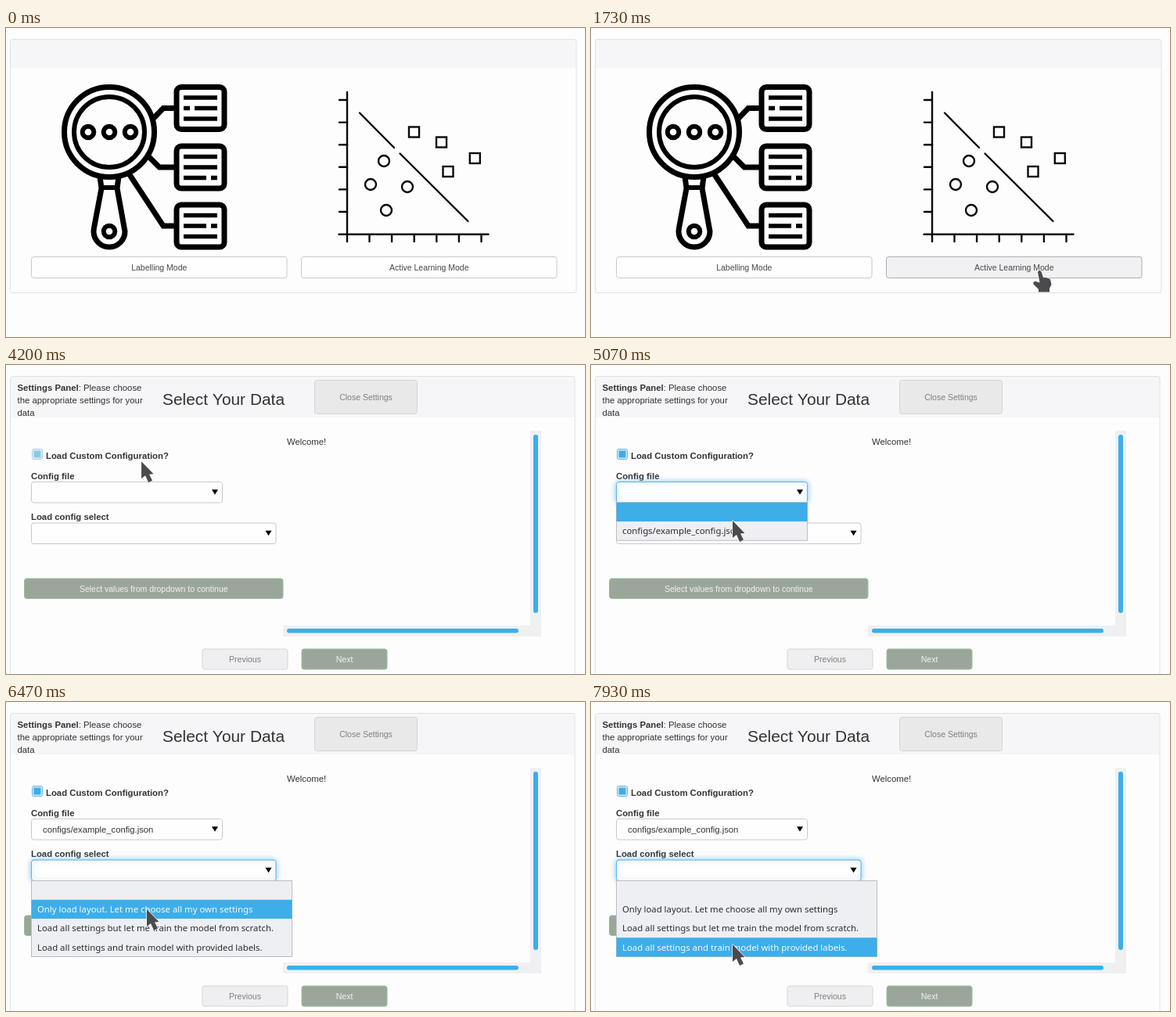
Animation, 740 px wide and 395 px high, one loop 8000 ms. Source, as an HTML page with a canvas:

```html
<!DOCTYPE html>
<html lang="en">
<head>
<meta charset="utf-8">
<title>Settings walkthrough</title>
<style>
html, body { margin: 0; width: 100%; height: 100%; overflow: hidden; background: #fefdfe; }
canvas { display: block; }
</style>
</head>
<body>
<canvas id="stage" width="740" height="395"></canvas>
<script>
const c = document.getElementById('stage').getContext('2d');
const LOOP = 8000, STEP = 1000 / 15;
const SANS = '"Liberation Sans", Arial, sans-serif';
const MENU = '"Noto Sans", "Open Sans", sans-serif';
const BLUE = '#3daee9', PAGE = '#fefdfe', INK = '#333';
const ROW = 24.25;

// Pointer keys: time, x, y
const PATH = [
  [667, 592, 398], [1000, 584, 345], [1200, 577, 321], [1400, 575, 310],
  [2467, 575, 310], [2600, 470, 257], [2800, 202, 147], [3000, 172, 119],
  [4133, 172, 119], [4200, 173, 123], [4330, 180, 148], [4533, 181, 165],
  [4800, 181, 165], [5067, 181, 199], [5200, 181, 211], [5400, 181, 213],
  [5867, 181, 213], [6200, 181, 217], [6467, 180, 265], [6733, 180, 266],
  [7000, 180, 266], [7267, 180, 287], [7600, 181, 294], [7867, 181, 310]
];

const CLICK = { press: 1665, release: 1730, page: 2200, check: 3200, layout: 3330,
  focus1: 4600, open1: 4665, pick1: 5600, focus2: 5930, open2: 6065 };

const clamp = v => Math.max(0, Math.min(1, v));
const fade = (t, at) => clamp((t - at + 40) / 140);

function pointer(t) {
  if (t <= PATH[0][0]) return null;
  const i = PATH.findIndex(k => k[0] > t);
  if (i < 0) return PATH[PATH.length - 1].slice(1);
  const [a, ax, ay] = PATH[i - 1], [b, bx, by] = PATH[i];
  const p = (t - a) / (b - a);
  return [ax + (bx - ax) * p, ay + (by - ay) * p];
}

function text(s, x, y, { size = 11.35, bold, color = INK, align = 'left', font = SANS } = {}) {
  c.font = `${bold ? 'bold ' : ''}${size}px ${font}`;
  c.fillStyle = color;
  c.textAlign = align;
  c.fillText(s, x, y);
}
const bold = (s, x, y) => text(s, x, y, { bold: true });

function box(x, y, w, h, r, fill, stroke) {
  c.beginPath();
  c.roundRect(x, y, w, h, r);
  if (fill) { c.fillStyle = fill; c.fill(); }
  if (stroke) { c.strokeStyle = stroke; c.lineWidth = 1; c.stroke(); }
}

function line(...p) {
  c.beginPath();
  for (let i = 0; i < p.length; i += 2) c.lineTo(p[i], p[i + 1]);
  c.stroke();
}

function ring(x, y, r) {
  c.beginPath();
  c.arc(x, y, r, 0, 7);
  c.stroke();
}

const LOOKS = {
  plain: ['#fffeff', '#c9c8ca', '#484848'],
  hover: ['#f1f0f2', '#adacae', '#484848'],
  off: ['#efeef0', '#d6d5d7', '#808080'],
  close: ['#eae9ea', '#d5d4d6', '#808080'],
  sage: ['#9ba69a', '#93c094', '#f0f3ef']
};
function button(s, x, y, w, h, look) {
  const [fill, edge, ink] = LOOKS[look];
  box(x, y, w, h, 3, fill, edge);
  text(s, x + w / 2, y + h / 2 + 4.3, { size: 10.5, color: ink, align: 'center' });
}

function panel(w, h, head) {
  box(5.5, 14.5, w, h, 3, PAGE);
  c.fillStyle = '#f6f5f7';
  c.fillRect(6, 15, w - 1, head - 15);
  box(5.5, 14.5, w, h, 3, null, '#e1e0e2');
}

function magnifier() {
  c.strokeStyle = '#000';
  c.lineCap = 'butt';
  c.lineJoin = 'miter';
  c.lineWidth = 7;
  ring(132, 133, 57.5);
  line(188, 116, 201, 102.5, 217, 102.5);
  line(182, 164, 196, 178, 217, 178);
  line(157, 186, 201, 253, 217, 253);
  c.beginPath();
  c.moveTo(120, 190);
  c.lineTo(122, 205);
  c.lineTo(112.4, 256);
  c.arc(132, 260, 20, Math.PI, 0, true);
  c.lineTo(142, 205);
  c.lineTo(144, 190);
  c.stroke();
  c.lineWidth = 6;
  line(121, 204, 143, 204);
  ring(132, 133, 45);
  for (const x of [105, 132, 159]) ring(x, 133, 7.3);
  ring(132, 260, 7.3);
  [102.5, 178, 253].forEach((y, i) => {
    c.lineWidth = 7;
    c.beginPath();
    c.roundRect(218, y - 27, 61, 54, 6);
    c.stroke();
    c.lineWidth = 5.5;
    const split = i === 1 ? 1 : 0;
    for (const k of [-1, 0, 1]) {
      const ly = y + k * 13.5;
      if (k !== split) line(227, ly, 270, ly);
      else {
        const gap = i === 0 ? 235 : 256;
        line(227, ly, gap, ly);
        line(gap + 6, ly, 270, ly);
      }
    }
  });
}

function chart() {
  c.strokeStyle = '#0a0a0a';
  c.lineCap = 'round';
  c.lineWidth = 2.4;
  line(436, 82, 436, 273);
  line(425.5, 263.7, 616.5, 263.7);
  for (let i = 0; i < 6; i++) {
    const y = 92 + i * 28.6, x = 464.5 + i * 28.6;
    line(426, y, 436, y);
    line(x, 264, x, 273);
  }
  line(452, 108.5, 496, 153);
  line(503.5, 160.5, 590.5, 247);
  for (const [x, y] of [[483, 170], [466, 200], [513, 203], [486, 233]]) ring(x, y, 7);
  for (const [x, y] of [[521.5, 133], [556.5, 146], [599.3, 166.5], [565, 183.5]])
    c.strokeRect(x - 6.5, y - 6.5, 13, 13);
}

function startPage(t, over) {
  panel(723.5, 324, 51);
  magnifier();
  chart();
  button('Labelling Mode', 32.5, 292.5, 326.5, 27, 'plain');
  button('Active Learning Mode', 377.5, 292.5, 326.5, 27, over ? 'hover' : 'plain');
  if (t >= CLICK.press && t < CLICK.release) {
    const g = c.createLinearGradient(0, 293, 0, 299);
    g.addColorStop(0, 'rgba(0,0,0,.14)');
    g.addColorStop(1, 'rgba(0,0,0,0)');
    c.fillStyle = g;
    c.fillRect(378, 293, 325.5, 6);
  }
}

function checkbox(y, on, hover) {
  if (!on) return box(33.5, y + .5, 13, 13, 2, hover ? '#f8fbfd' : '#efeff0', hover ? '#93cee9' : '#a3a4a6');
  box(33.5, y + .5, 13, 13, 2, hover ? '#e3eff5' : '#d5eaf6', hover ? '#a9cfe1' : '#68b7df');
  c.fillStyle = hover ? '#90c9e5' : BLUE;
  c.fillRect(35.5, y + 2.5, 9, 9);
}

function select(y, w, value, glow = 0) {
  c.save();
  if (glow) {
    c.shadowColor = `rgba(90,180,233,${.75 * glow})`;
    c.shadowBlur = 7;
  }
  box(32.5, y, w, 26.5, 3, '#fffeff', glow > .4 ? '#5cb3e4' : '#c9c8ca');
  c.restore();
  text(value, 47, y + 17.6, { size: 11.25 });
  const x = 32.5 + w - 9.5, m = y + 12.7;
  c.fillStyle = '#000';
  c.beginPath();
  c.moveTo(x - 4, m - 3);
  c.lineTo(x + 4, m - 3);
  c.lineTo(x, m + 3.6);
  c.fill();
}

function menu(top, w, items, tipY) {
  const h = items.length * ROW;
  const hot = Math.max(0, Math.min(items.length - 1, Math.floor((tipY - top) / ROW)));
  c.fillStyle = '#eeeff2';
  c.fillRect(32, top, w, h);
  c.strokeStyle = '#bcbdbf';
  c.lineWidth = 1;
  c.strokeRect(32.5, top, w - 1, h);
  c.fillStyle = BLUE;
  c.fillRect(32.5, top + hot * ROW, w - 1, ROW);
  items.forEach((s, i) => text(s, 40, top + i * ROW + 16.3,
    { font: MENU, color: i === hot ? '#f4fafd' : '#2b2d30' }));
}

function header(lines, titleX, closeX, closeW) {
  bold('Settings Panel', 14.5, 33);
  const w = c.measureText('Settings Panel').width;
  lines.forEach((s, i) => text(s, 14.5 + (i ? 0 : w), 33 + i * 16.2));
  text('Select Your Data', titleX, 51, { size: 20.9 });
  button('Close Settings', closeX, 19.5, closeW, 43, 'close');
}

function footer(y) {
  button('Previous', 251, y, 109, 26, 'off');
  button('Next', 378, y, 109, 26, 'sage');
}

function dataPage(on, hover) {
  panel(579.5, 400, 73);
  header([': Please', 'choose the appropriate', 'settings for your data'], 179, 352.5, 131);
  text('Welcome!', 290.5, 108);
  checkbox(113, on, hover);
  bold('Load Custom Configuration?', 51, 126.3);
  bold('Dataset', 32, 152);
  select(155.8, 244, 'example_dataset.fits');
  checkbox(192, true, false);
  bold('Optimise for memory?', 51, 205.3);
  box(185, 187, 20.5, 25, 10, '#5b5b5e');
  text('?', 195.3, 204.5, { size: 13, bold: true, color: '#d3e3e8', align: 'center' });
  button('Load Data File', 23.5, 266, 262, 26, 'plain');
  footer(338.5);
}

function configPage(t, hover, tipY) {
  panel(721.5, 400, 67);
  header([': Please choose', 'the appropriate settings for your', 'data'], 200, 394.5, 131);
  text('Welcome!', 359, 102);
  c.fillStyle = '#eff0f2';
  c.fillRect(670, 84, 14, 263);
  c.fillRect(354, 333, 330, 14);
  box(674, 89, 6, 228, 3, BLUE);
  box(359, 337, 296, 5.5, 2.7, BLUE);

  checkbox(107, true, hover);
  bold('Load Custom Configuration?', 51, 120.3);
  bold('Config file', 32, 145.7);
  bold('Load config select', 32, 198.2);
  const lost = fade(t, CLICK.focus2) * (t >= CLICK.focus2);
  const got = fade(t, CLICK.focus1) * (t >= CLICK.focus1);
  select(149.5, 244, t >= CLICK.pick1 ? 'configs/example_config.json' : '', got - lost);
  select(202, 312.5, '', lost);
  button('Select values from dropdown to continue', 23.5, 273, 330.5, 25.5, 'sage');
  footer(363);

  if (t >= CLICK.open1 && t < CLICK.pick1)
    menu(175.8, 245, ['', 'configs/example_config.json'], tipY);
  if (t >= CLICK.open2)
    menu(228.5, 334, ['', 'Only load layout. Let me choose all my own settings',
      'Load all settings but let me train the model from scratch.',
      'Load all settings and train model with provided labels.'], tipY);
}

const ARROW = new Path2D('M0 0V22L5 18L9 27L14 24.5L10 16.5L15.5 16Z');
const HAND = new Path2D('M-4 2Q-2.5 -1.5 .5 1.5L3 9Q10 8.5 12 11.5L13.5 18L11 23V27.5H-3V24L-9.5 17.5Q-10.5 13.5 -6.5 14L-1.5 15.5Z');
function drawPointer(x, y, shape) {
  c.save();
  c.translate(x, y);
  c.lineJoin = 'round';
  c.lineWidth = 1.6;
  c.strokeStyle = 'rgba(255,255,255,.85)';
  c.stroke(shape);
  c.fillStyle = '#4b4b4d';
  c.fill(shape);
  c.restore();
}

function draw(now) {
  const t = Math.floor((now % LOOP + 5) / STEP) * STEP + 1;
  const tip = pointer(t);
  const [x, y] = tip || [0, 999];
  const start = t < CLICK.page;
  const overButton = start && y < 319;
  const overLabel = x < 208 && y < 128;
  c.fillStyle = PAGE;
  c.fillRect(0, 0, 740, 395);
  if (start) startPage(t, overButton);
  else if (t < CLICK.layout) dataPage(t >= CLICK.check, overLabel);
  else configPage(t, overLabel, y);
  if (tip) drawPointer(x, y, overButton ? HAND : ARROW);
}

function tick() {
  draw(performance.now());
  requestAnimationFrame(tick);
}
tick();
</script>
</body>
</html>
```
